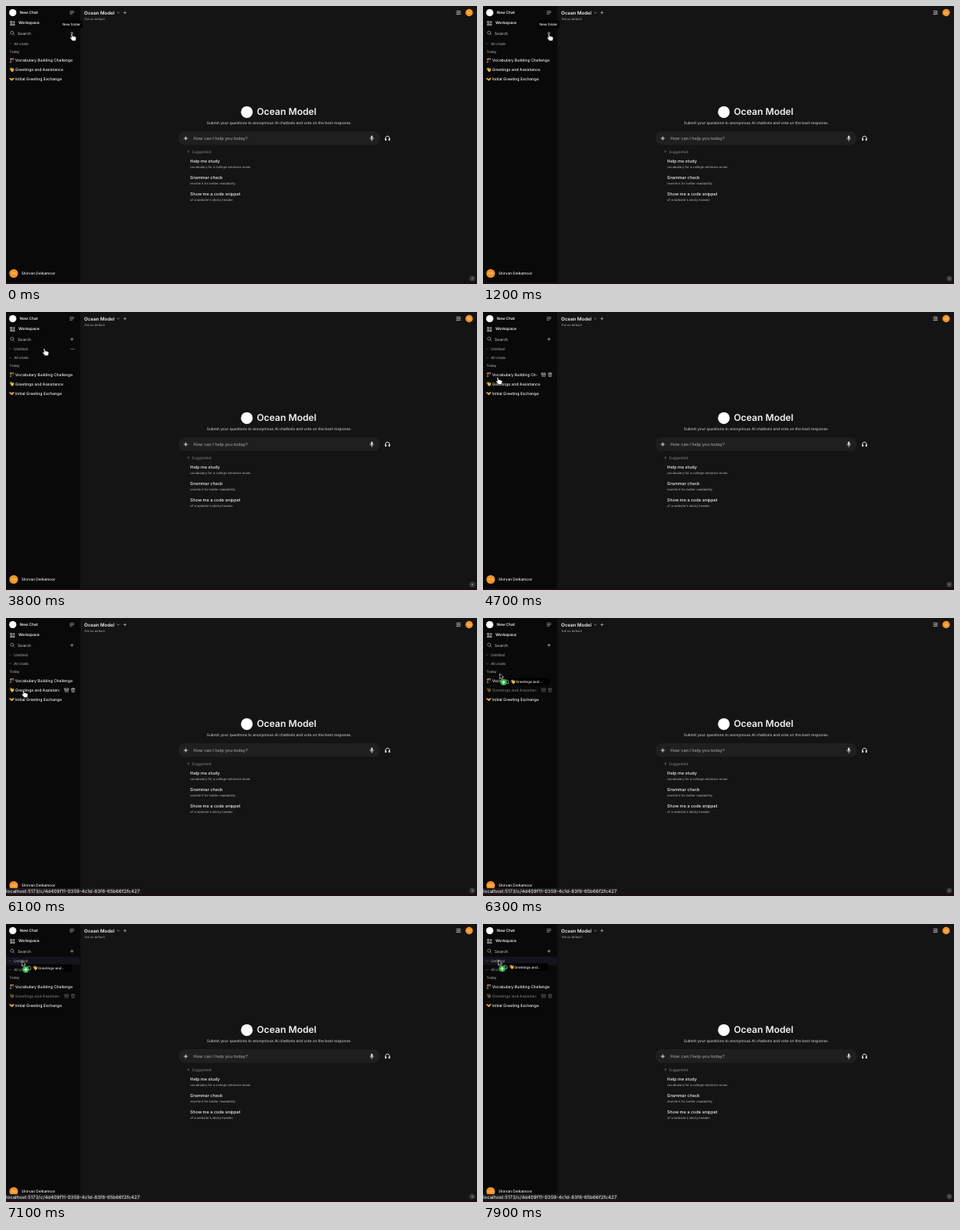
These frames come from a looping animation (600x355 px, 8 s). An HTML page:

```html
<!DOCTYPE html>
<html lang="en">
<head>
<meta charset="utf-8">
<title>Chat folders</title>
<style>
  html, body { margin: 0; width: 100%; height: 100%; overflow: hidden; background: #141414; }
  svg { display: block; width: 100vw; height: 100vh; }
  text { font-family: Inter, "Liberation Sans", sans-serif; text-rendering: geometricPrecision; white-space: pre; }
  .line { fill: none; stroke-linecap: round; stroke-linejoin: round; }
</style>
</head>
<body>
<svg id="stage" viewBox="0 0 600 355"></svg>
<script>
const MAIN = '#141414', SIDE = '#090909', WHITE = '#f2f2f2', GREY = '#9c9c9c', DIM = '#747474';
const LOOP = 8000, SHIFT = 10.5;

// Text is placed by its left edge and vertical middle.
const text = (x, y, size, str, fill = WHITE, weight = 450, anchor = 'start') =>
  `<text x="${x}" y="${y + size * .36}" font-size="${size}" fill="${fill}" font-weight="${weight}" text-anchor="${anchor}">${str}</text>`;
const line = (d, color = WHITE, width = .7) =>
  `<path class="line" d="${d}" stroke="${color}" stroke-width="${width}"/>`;
const rect = (x, y, w, h, fill, r = 0) =>
  `<rect x="${x}" y="${y}" width="${w}" height="${h}" rx="${r}" fill="${fill}"/>`;
const dot = (x, y, r, fill) => `<circle cx="${x}" cy="${y}" r="${r}" fill="${fill}"/>`;
const plus = (x, y, r, color, width) => line(`M${x - r} ${y}h${2 * r}M${x} ${y - r}v${2 * r}`, color, width);
const down = (x, y, r, color, width) => line(`M${x - r} ${y - r / 2}l${r} ${r} ${r} ${-r}`, color, width);
const group = (id, body) => `<g id="${id}">${body}</g>`;
const avatar = (x, y, r, size) => dot(x, y, r, '#f7941d') + text(x, y, size, 'SD', '#ffe9c8', 400, 'middle');

const crane = (x, y) => line(`M${x - 1.6} ${y + 2.6}L${x - .8} ${y - 2.4}`, '#a9824c', 1) +
  line(`M${x - 2.2} ${y - 1.8}L${x + 2.4} ${y - 2.3}`, '#d9a050', 1.1) +
  line(`M${x + 1.6} ${y - 2}v2.4`, '#9aa3a8', .6) + rect(x - 2.6, y + 1.8, 2.6, 1, '#8b6b45');
const wave = (x, y) => `<g transform="translate(${x} ${y}) rotate(-35)">` +
  rect(-1.5, -.8, 3.4, 3.4, '#f9b934', 1.2) +
  line('M-1.1 0V-2.2M0 0V-2.7M1.1 0V-2.3M1.7 1.2L2.6-.2', '#f9b934', .9) + '</g>';
const shake = (x, y) => line(`M${x - 2.3} ${y - .9}L${x + .7} ${y + 1.1}M${x + 2.3} ${y - .9}L${x - .6} ${y + .8}`, '#f5b22f', 1.7) +
  line(`M${x - .6} ${y - .6}l1.6 1.1`, '#c47f1c', .5);

const chats = [
  ['Vocabulary Building Challenge', crane, 69.5],
  ['Greetings and Assistance', wave, 81.5],
  ['Initial Greeting Exchange', shake, 93.5]
];
const tools = y => rect(66, y - 4, 4, 8, 'url(#fade)') + rect(70, y - 4, 22, 8, SIDE) +
  line(`M74.7 ${y - 2.1}h5v1.4h-5zM75.2 ${y - .7}v2.9h4v-2.9M76.5 ${y + .5}h1.4`, '#d8d8d8', .6) +
  line(`M83 ${y - 1.6}h4.8M84.6 ${y - 1.7}v-.8h1.6v.8M83.6 ${y - 1.5}l.3 4h3l.3-4M84.8 ${y - .4}v1.9M86 ${y - .4}v1.9`, '#d8d8d8', .55);
const chatRow = ([name, icon, y], i) =>
  group('chat' + i, icon(7.3, y) + text(11.8, y, 5, name, WHITE, 500) + group('tools' + i, tools(y)));

const suggestions = [
  ['Help me study', 'vocabulary for a college entrance exam'],
  ['Grammar check', 'rewrite it for better readability'],
  ['Show me a code snippet', "of a website's sticky header"]
];

const mainPane =
  text(99.5, 8.5, 6.05, 'Ocean Model', WHITE, 600) + down(143, 8.6, 1.4, '#bbb', .6) +
  plus(151.5, 8.5, 1.6, '#ccc', .6) + text(100, 17, 3.95, 'Set as default', '#979797') +
  line('M573.8 6.5h1.5M577 6.5h2M573.8 8.5h3M578.4 8.5h.6M573.8 10.5h.8M576.3 10.5h2.7M576 5.8v1.4M577.6 7.8v1.4M575.4 9.8v1.4', '#d0d0d0') +
  avatar(590, 8.5, 4.7, 3.8) +
  dot(306.8, 135.4, 7.5, '#fff') + text(319.4, 135.2, 11.9, 'Ocean Model', WHITE, 600) +
  text(255.8, 149.4, 4.81, 'Submit your questions to anonymous AI chatbots and vote on the best response.', '#c0c0c0') +
  rect(219.5, 160, 257, 17.5, '#1f1f1f', 8.7) + plus(229, 169, 2.1, WHITE, .9) +
  text(238.8, 168.9, 5.5, 'How can I help you today?', GREY) +
  rect(464.8, 165.6, 2.4, 4.4, '#d4d4d4', 1.2) + line('M463.8 168.7c0 3 4.4 3 4.4 0M466 171v1.3', '#d4d4d4') +
  line('M483.2 169.5c-.2-4.6 5.8-4.6 5.6 0', WHITE, .9) +
  rect(482.8, 169, 1.8, 3, WHITE, .7) + rect(487.4, 169, 1.8, 3, WHITE, .7) +
  `<path d="M232.7 183.6l-1.6 2.6h1.1l-.4 2 1.7-2.7h-1.1z" fill="${DIM}"/>` + text(236.8, 186, 4.8, 'Suggested', DIM) +
  suggestions.map(([head, sub], i) =>
    text(234.6, 198.5 + i * 20.9, 5.48, head, WHITE, 550) +
    text(234.6, 206 + i * 20.8, 4.07, sub, '#a0a0a0')).join('') +
  dot(594, 348, 3.6, '#3b3b3b') + text(594, 348, 4.2, '?', '#c8c8c8', 400, 'middle');

const sidebar = rect(0, 0, 94.6, 355, SIDE) +
  dot(8.6, 8.5, 4.6, '#fff') + text(17.6, 8.5, 4.85, 'New Chat', WHITE, 600) +
  line('M81.6 6.7h4.8M81.6 8.5h4.8M81.6 10.3h2.8', '#cfcfcf', .6) +
  line('M6 19.6h1.7v1.7h-1.7zM6 22.8h1.7v1.7h-1.7zM9.2 22.8h1.7v1.7h-1.7zM9.2 20.4h1.8M10.1 19.5v1.8', WHITE, .65) +
  text(15.9, 21.7, 4.88, 'Workspace', WHITE, 600) +
  line('M9.7 34.1a2 2 0 1 1-4 0a2 2 0 1 1 4 0M9.2 35.6l1.4 1.5', '#bdbdbd', .6) +
  text(14.8, 34.7, 5.1, 'Search', '#b0b0b0') + plus(84, 34.7, 1.7, '#c4c4c4', .65) +
  group('folder',
    `<rect id="drop" x="0" y="41.8" width="94" height="10.6" fill="#14141f"/>` +
    group('closed', line('M5 45.9l1.1 1.2-1.1 1.2', DIM, .55)) + group('open', down(5.4, 47.2, 1.1, DIM, .55)) +
    text(10, 47.2, 4.75, 'Untitled', GREY) +
    group('more', dot(82.8, 47.2, .55, '#ccc') + dot(84.6, 47.2, .55, '#ccc') + dot(86.4, 47.2, .55, '#ccc'))) +
  group('list', down(5.4, 48, 1.1, DIM, .55) + text(10, 48, 4.6, 'All chats', GREY) +
    text(4.4, 58.1, 4.35, 'Today', '#a6a6a6') + chats.map(chatRow).join('')) +
  avatar(9.8, 341.5, 5.5, 4) + text(19.8, 341.5, 4.75, 'Shirvan Delkamoor', WHITE, 550);

const overlays =
  group('tip', rect(69.5, 18.6, 28, 9.6, '#000', 2) + text(72, 23.4, 4.4, 'New folder', '#f4f4f4', 500)) +
  group('status', rect(0, 345, 172, 10, '#1d1a1b') +
    text(0, 349.3, 6.02, 'localhost:5173/c/4d409f11-0359-4c1d-83f6-65b66f2fc427', '#e4e4e4')) +
  rect(0, 353.2, 600, 1.8, '#210c11') +
  group('ghost', rect(4, -4.7, 61, 9.4, '#000', 2.5) +
    line('M9-2.2h2l1.2 1.2v3.2h-3.2z', WHITE, .6) + wave(18, 0) + text(21.6, 0, 4.45, 'Greetings and...', WHITE, 500)) +
  group('hand', `<path d="M-2.1-3.8c0-1.1 1.6-1.1 1.7 0l.3 2.6c.4-.6 1.400-.5 1.600.2c.6-.5 1.400-.2 1.500.5c.8-.2 1.400.2 1.400 1c0 1.600-.3 2.600-.9 4h-4c-.8-1.400-1.800-2.300-2.600-3.300c-.6-.9.6-1.700 1.500-.8z" fill="#fff" stroke="#000" stroke-width=".5"/>`) +
  group('arrow', `<path d="M-2.5-4v6.8l1.6-1.5 1.2 2.7 1.3-.6-1.2-2.6h2.2z" fill="#000" stroke="#fff" stroke-width=".6"/>` +
    dot(2.5, 7, 4.1, '#28b53c') + plus(2.5, 7, 2, '#fff', 1.1));

document.getElementById('stage').innerHTML =
  `<defs><linearGradient id="fade"><stop stop-color="${SIDE}" stop-opacity="0"/><stop offset="1" stop-color="${SIDE}"/></linearGradient></defs>` +
  rect(0, 0, 600, 355, MAIN) + mainPane + sidebar + overlays;

const el = id => document.getElementById(id);
const show = (id, on) => el(id).setAttribute('visibility', on ? 'visible' : 'hidden');
const move = (id, x, y) => el(id).setAttribute('transform', `translate(${x} ${y})`);

// Pointer path: time, x, y
const path = [
  [0, 85, 40], [2000, 85, 40], [2300, 41.5, 49], [2700, 36, 50], [3000, 36, 50],
  [3400, 42, 50.5], [3800, 50, 51.3], [3900, 51, 51.5], [4200, 54, 52.5], [4400, 54, 52.5],
  [4700, 20, 88], [4800, 20, 88], [4900, 21, 92], [5300, 23.5, 97], [6100, 23.5, 97],
  [6500, 24, 53], [6600, 23.5, 52], [6900, 23, 51.5], [7200, 22.6, 51], [7400, 22.6, 51], [7900, 22, 50], [8000, 22, 50]
];
function pointer(t) {
  const i = path.findIndex(p => p[0] > t);
  const [a, ax, ay] = path[i - 1], [b, bx, by] = path[i];
  const k = (t - a) / (b - a);
  return [ax + (bx - ax) * k, ay + (by - ay) * k];
}

function draw(now) {
  const t = Math.floor(now % LOOP / 100) * 100;
  const [x, y] = pointer(t), tip = y - 4;
  const made = t >= 1600, opened = t >= 2900, drag = t >= 6200;
  const overFolder = made && x < 80 && tip > 41.5 && tip < 53;

  show('tip', !made);
  show('folder', made);
  show('closed', made && !opened);
  show('open', opened);
  show('more', overFolder && !drag);
  show('drop', overFolder && drag);
  move('list', 0, made ? SHIFT : 0);
  show('tools0', t >= 4600 && !drag && tip > 74 && tip < 86);
  show('tools1', drag || t >= 4900 && tip >= 86);
  show('tools2', false);
  el('chat1').setAttribute('opacity', drag ? .45 : 1);
  show('status', t >= 4900);

  show('hand', !drag);
  show('arrow', drag);
  show('ghost', drag);
  move('hand', x, y);
  move('arrow', x, y);
  move('ghost', x - 3.6, y + (t < 7000 ? 6.5 : 5));
}

const start = performance.now();
function tick() {
  draw(performance.now() - start);
  requestAnimationFrame(tick);
}
tick();
</script>
</body>
</html>
```
